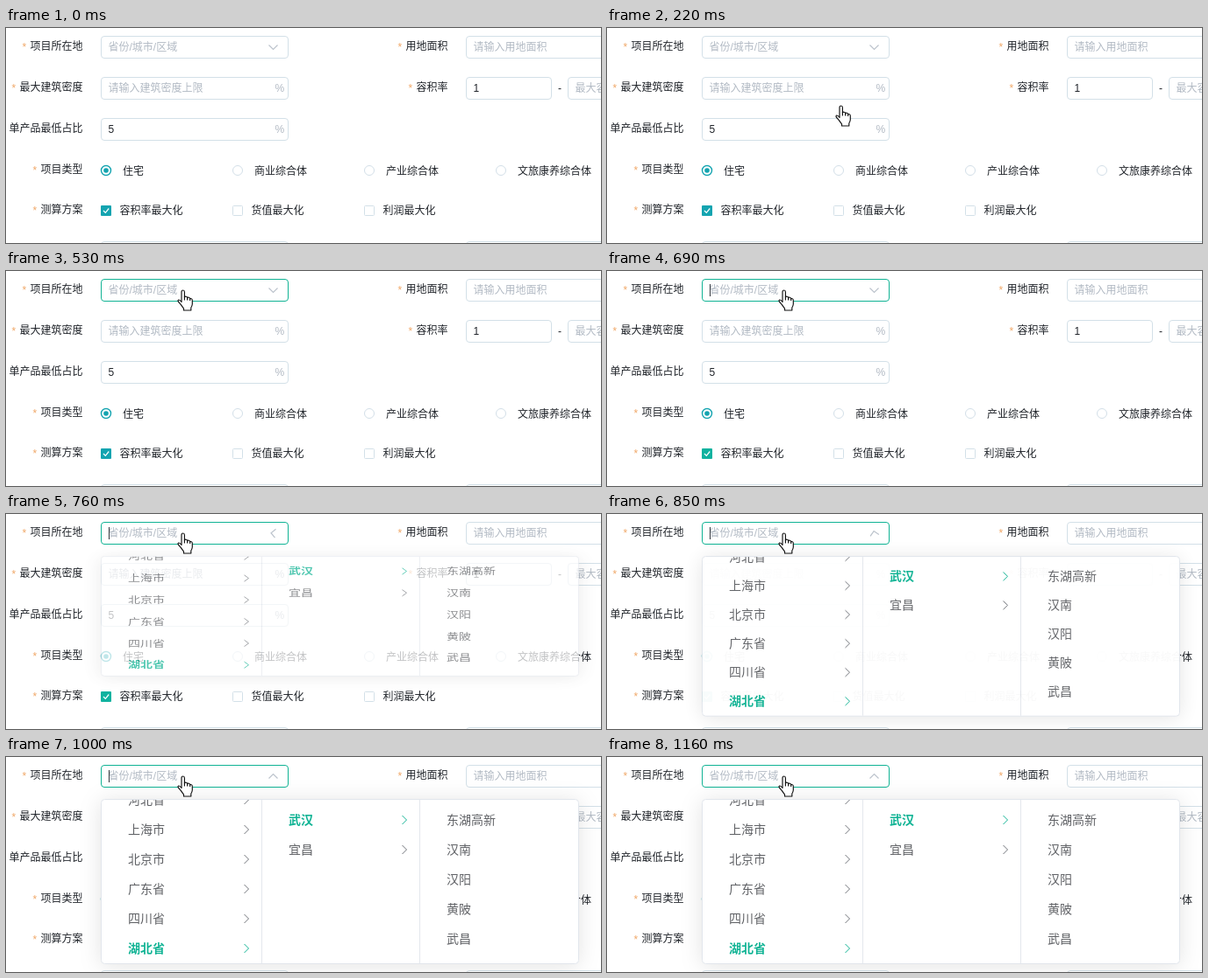
An HTML page for the animation above (1460 ms loop, 678 by 246 pixels).

```html
<!DOCTYPE html>
<html lang="zh-CN">
<head>
<meta charset="utf-8">
<title>表单级联选择</title>
<style>
html, body { margin: 0; width: 100%; height: 100%; overflow: hidden; background: #fff; }
svg { display: block; width: 678px; height: 246px; }
text { font: 12px "Liberation Sans", "Noto Sans CJK SC", "Noto Sans CJK", sans-serif; fill: #20242a; }
.hint { fill: #b2bac4; }
.star { fill: #f0a868; }
.box { fill: #fff; stroke: #d3e0e8; }
.item { font-size: 14px; fill: #606266; }
.on { fill: #10b394; font-weight: 700; }
.line { fill: none; stroke: #707379; }
.line.sel { stroke: #10b394; }
.panel { fill: #fff; stroke: #e2e6ec; filter: drop-shadow(0 2px 12px rgba(0,0,0,.11)); }
</style>
</head>
<body>
<svg id="stage" viewBox="0 0 678 246" xmlns="http://www.w3.org/2000/svg">
  <defs><clipPath id="clip"><rect x="109" y="49" width="543" height="187"/></clipPath></defs>
  <g id="form"></g>
  <path id="arrow" d="M-5 -2.5L0 2.5L5 -2.5" fill="none" stroke="#bcc3cc" stroke-width="1.2"/>
  <path id="caret" d="M117.5 15V29" stroke="#30353c"/>
  <g id="drop">
    <rect class="panel" x="108.5" y="48.5" width="544" height="188" rx="4"/>
    <path d="M291.5 49V236M471.5 49V236" stroke="#e4e7ed"/>
    <g id="menus" clip-path="url(#clip)"></g>
  </g>
  <g id="hand" stroke="#111" stroke-width="1.15" stroke-linejoin="round" stroke-linecap="round">
    <path fill="#fff" d="M5 14.5V3Q5 1 6.7 1Q8.4 1 8.4 3V8.8Q9 8 10.2 8.2Q11.5 8.4 11.6 9.6Q12.4 8.9 13.5 9.3Q14.6 9.6 14.7 10.7Q15.6 10.2 16.6 10.9Q17.4 11.5 17.3 13V17Q17 19.3 15.8 21V24H7.5V21.8Q5.8 19.8 4.4 17.6L1.3 14Q.5 12.6 1.7 12Q3.1 11.7 5 14.5Z"/>
    <path fill="none" d="M8.4 8.8V12M11.6 9.6V12M14.7 10.7V12.5"/>
  </g>
</svg>
<script>
const $ = id => document.getElementById(id);
const LOOP = 1460;
const STEPS = [0, 70, 150, 230, 300, 380, 450, 530, 610, 690, 760, 850, 930, 1000, 1160];
const TEAL = '#14a4b0';
const IDLE = [211, 224, 232], FOCUS = [16, 179, 148];

const text = (x, y, s, cls = '') => `<text x="${x}" y="${y}" class="${cls}">${s}</text>`;
const box = (x, y, w, id = '') =>
  `<rect id="${id}" class="box" x="${x + .5}" y="${y + .5}" width="${w - 1}" height="25" rx="3.5"/>`;
const label = (right, y, s, required = true) => {
  const x = right - .5 - 12 * s.length;
  return (required ? text(x - 9, y + 1, '*', 'star') : '') + text(x, y, s);
};

function buildForm() {
  const labels = [
    [88, 25, '项目所在地'], [88, 72, '最大建筑密度'], [88, 119, '单产品最低占比', false],
    [88, 166, '项目类型'], [88, 212, '测算方案'], [504, 25, '用地面积'], [504, 72, '容积率']
  ];
  let out = labels.map(a => label(...a)).join('');
  out += box(108, 9, 214, 'field') + box(108, 56, 214) + box(108, 103, 214) + box(108, 244, 214);
  out += box(524, 9, 214) + box(524, 56, 98) + box(640, 56, 98) + box(524, 244, 214);
  out += text(116.5, 26, '省份/城市/区域', 'hint') + text(116.5, 73, '请输入建筑密度上限', 'hint');
  out += text(532.5, 26, '请输入用地面积', 'hint') + text(648.5, 73, '最大容积率', 'hint');
  out += text(306.5, 73, '%', 'hint') + text(306.5, 120, '%', 'hint');
  out += text(116.5, 120, '5') + text(532.5, 73, '1') + text(629, 73, '-');

  ['住宅', '商业综合体', '产业综合体', '文旅康养综合体'].forEach((s, i) => {
    const x = 114 + 150 * i;
    out += `<circle cx="${x}" cy="163" r="5.5" fill="#fff" stroke="${i ? '#d3dfe8' : TEAL}" stroke-width="${i ? 1 : 1.4}"/>`;
    if (!i) out += `<circle cx="${x}" cy="163" r="2.8" fill="${TEAL}"/>`;
    out += text(x + 19, 168, s);
  });
  ['容积率最大化', '货值最大化', '利润最大化'].forEach((s, i) => {
    const x = 108 + 150 * i;
    out += i
      ? `<rect class="box" x="${x + .5}" y="203.5" width="11" height="11" rx="1"/>`
      : `<rect id="check" x="${x}" y="203" width="12" height="12" rx="1"/>` +
        `<path d="M111 209L113.3 211.3L117.2 206.5" fill="none" stroke="#fff" stroke-width="1.2"/>`;
    out += text(x + 21.5, 213, s);
  });
  $('form').innerHTML = out;
}

function buildMenus() {
  const menus = [
    [139, 49, '河北省 上海市 北京市 广东省 四川省 湖北省', 5, 274],
    [322, 72, '武汉 宜昌', 0, 454],
    [502, 72, '东湖高新 汉南 汉阳 黄陂 武昌', -1, 0]
  ];
  $('menus').innerHTML = menus.map(([x, top, names, chosen, tip]) =>
    names.split(' ').map((s, i) => {
      const y = top + 34 * i, on = i === chosen;
      const mark = tip
        ? `<path class="line ${on ? 'sel' : ''}" d="M${tip - 2.5} ${y - 5}l5 5l-5 5"/>` : '';
      return text(x, y + 5, s, on ? 'item on' : 'item') + mark;
    }).join('')).join('');
}

// CSS-style cubic-bezier timing, solved by bisection
function bezier(x1, y1, x2, y2, x) {
  if (x <= 0) return 0;
  if (x >= 1) return 1;
  const at = (a, b, s) => 3 * a * s * (1 - s) ** 2 + 3 * b * s * s * (1 - s) + s ** 3;
  let lo = 0, hi = 1;
  for (let i = 0; i < 24; i++) {
    const mid = (lo + hi) / 2;
    if (at(x1, x2, mid) < x) lo = mid; else hi = mid;
  }
  return at(y1, y2, lo);
}
const ease = x => bezier(.25, .1, .25, 1, x);

function draw(ms) {
  const t = STEPS.filter(s => s <= ms).pop();

  const left = Math.max(0, (450 - t) / 380);
  const hx = 195 + Math.round(168 * left ** 4);
  const hy = 21 + Math.round(110 * left ** 2.1);
  $('hand').setAttribute('transform', `translate(${hx} ${hy})`);
  $('hand').style.display = t < 70 ? 'none' : '';

  const focus = ease((t - 350) / 200);
  $('field').style.stroke = `rgb(${IDLE.map((c, i) => c + (FOCUS[i] - c) * focus)})`;
  $('check').style.fill = t >= 690 ? '#0fb29f' : TEAL;
  $('caret').style.display = t >= 610 && t < 1160 ? '' : 'none';

  const turn = 180 * ease((t - 690) / 226);
  $('arrow').setAttribute('transform', `translate(304.5 22) rotate(${turn})`);

  const open = bezier(.23, 1, .32, 1, (t - 693) / 300);
  $('drop').style.display = open ? '' : 'none';
  $('drop').setAttribute('opacity', open);
  $('drop').setAttribute('transform', `translate(0 48) scale(1 ${open}) translate(0 -48)`);
}

buildForm();
buildMenus();
const start = performance.now();
function tick() {
  draw((performance.now() - start) % LOOP);
  requestAnimationFrame(tick);
}
tick();
</script>
</body>
</html>
```
